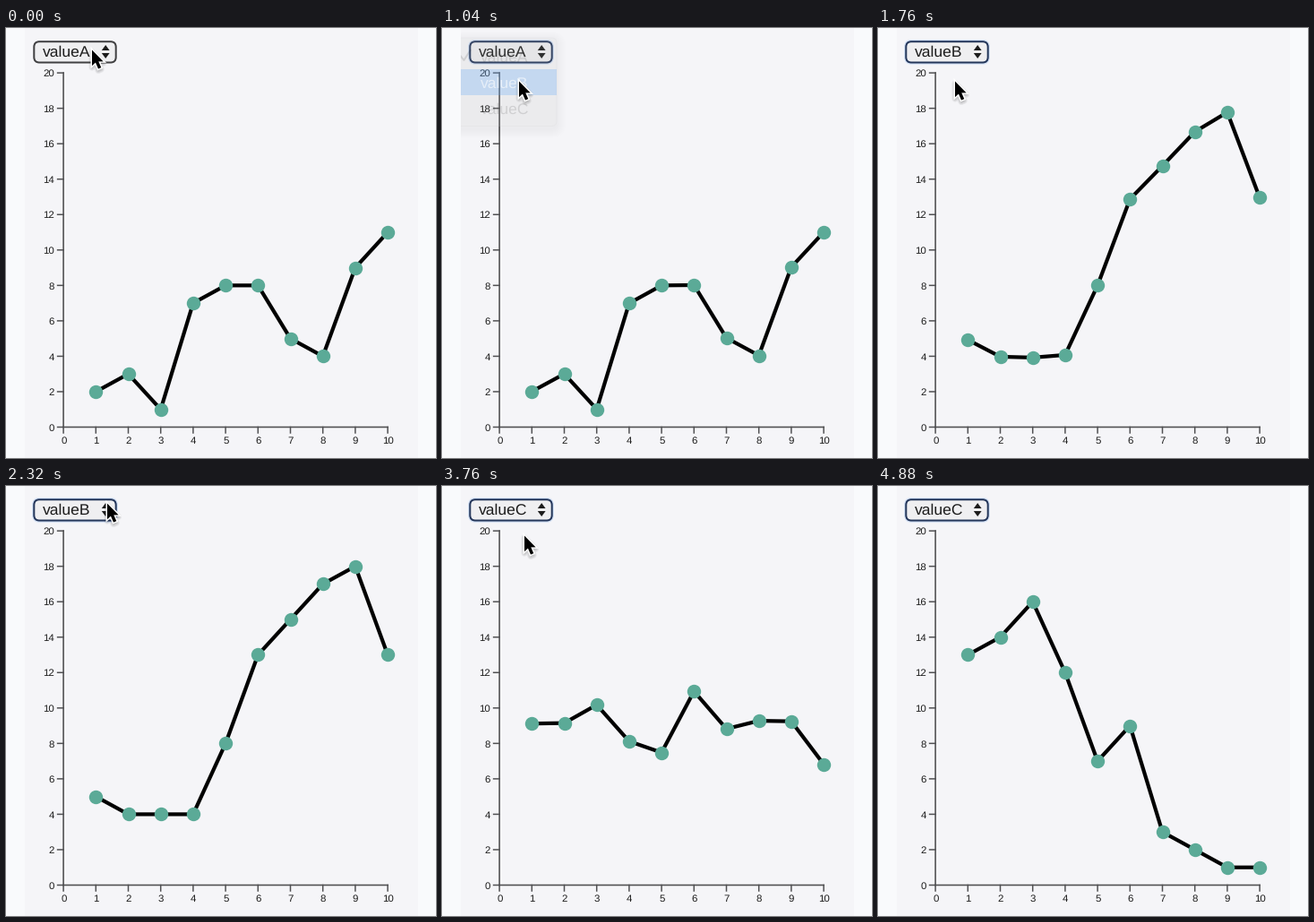
Animation, 480 px wide and 480 px high, one loop 5200 ms. Source, as a matplotlib script:

```python
import matplotlib.pyplot as plt
import numpy as np
from matplotlib.animation import FuncAnimation
from matplotlib.patches import FancyBboxPatch, Polygon, Rectangle

SIZE, STEP, LOOP = 480, 80, 5200
PX = 0.72  # points per pixel at 100 dpi
plt.rcParams["font.family"] = "Liberation Sans"
plt.rcParams["text.hinting"] = "none"

NAMES = ["valueA", "valueB", "valueC"]
SERIES = np.array([
    [2, 3, 1, 7, 8, 8, 5, 4, 9, 11],
    [5, 4, 4, 4, 8, 13, 15, 17, 18, 13],
    [13, 14, 16, 12, 7, 9, 3, 2, 1, 1],
])
DURATION = 1000
STARTS = (944, 3255)  # line transitions
OPENS = (240, 2480)   # menu appears
CURSOR_GONE = 4880
ROW_H, ROW_TOP = 29.2, 17

# Pointer: resting spot, then (start, end, new spot)
REST = np.array([96, 24.5])
MOVES = [(320, 640, (86, 59.5)), (1920, 2320, (113, 19.5)),
         (2560, 2880, (92, 55.5))]
ARROW = 0.9 * np.array([(0, 0), (0, 19.6), (4.4, 15.6), (7.8, 23.4),
                        (11.4, 21.8), (8.1, 14.3), (14, 14.3)])

INK, DARK, PAGE = "#505052", "#1c1c1c", "#f9fafc"

fig = plt.figure(figsize=(4.8, 4.8), dpi=100, facecolor=PAGE)
ax = fig.add_axes([0, 0, 1, 1])
ax.set(xlim=(0, SIZE), ylim=(SIZE, 0))
ax.axis("off")


def px(v):
    return 64.1 + 36.2 * np.asarray(v)


def py(v):
    return 445.5 - 19.77 * np.asarray(v)


def label(x, y, s, size, **kw):
    return ax.text(x, y, s, fontsize=size * PX, va="baseline", **kw)


def stroke(xs, ys, width, color, **kw):
    return ax.plot(xs, ys, color=color, lw=width * PX, snap=False, **kw)[0]


def box(x0, y0, x1, y1, radius, **kw):
    style = f"round,pad=0,rounding_size={radius}"
    return ax.add_patch(FancyBboxPatch((x0, y0), x1 - x0, y1 - y0,
                                       boxstyle=style, **kw))


def shape(points, **kw):
    return ax.add_patch(Polygon(points, closed=True, **kw))


def cubic_in_out(t):
    t = np.clip(t, 0, 1)
    return 4 * t ** 3 if t < 0.5 else 1 - 4 * (1 - t) ** 3


def smooth(t):
    t = np.clip(t, 0, 1)
    return t * t * (3 - 2 * t)


# Panel; the strip on its left also hides the menu's overhang
ax.add_patch(Rectangle((21, 0), 439, SIZE, fc="#f5f5f8", lw=0, zorder=0))
ax.add_patch(Rectangle((0, 0), 21, SIZE, fc=PAGE, lw=0, zorder=20))

# Axes
left, base = px(0), py(0)
stroke([left, left], [py(20), base], 1.6, INK, zorder=1)
stroke([left, px(10)], [base, base], 1.6, INK, zorder=1)
for v in range(0, 21, 2):
    stroke([left - 6.5, left], [py(v)] * 2, 1.5, INK, zorder=1)
    label(54.3, py(v) + 4.2, str(v), 11.5, ha="right", color=DARK)
for v in range(11):
    stroke([px(v)] * 2, [base, base + 6.5], 1.5, INK, zorder=1)
    label(px(v) + 0.2, 464, str(v), 11.5, ha="center", color=DARK)

# Chart
xs = px(np.arange(1, 11))
line = stroke(xs, xs, 4.2, "black", zorder=3, solid_joinstyle="miter")
dots = stroke(xs, xs, 0, "#5baa97", zorder=4, marker="o",
              markersize=15.4 * PX, markeredgewidth=0)

# Select button
halo = box(31.3, 15.2, 122.7, 38.5, 6, fc="none", ec="#d3e1f5", lw=4.5 * PX,
           zorder=5)
button = box(31.3, 15.2, 122.7, 38.5, 6, fc="#efeff1", lw=2 * PX, zorder=5)
choice = label(41.3, 32.2, "", 17.5, color=DARK, zorder=6)
for tip, foot in ((19, 25), (34, 28)):
    shape([(111.2, tip), (106.8, foot), (115.6, foot)], fc=DARK, lw=0,
          zorder=6)

# Menu
shadows = [box(0, 0, 1, 1, 6 + k, fc="black", lw=0, zorder=10)
           for k in range(1, 11)]
sheet = box(0, 0, 1, 1, 6, fc="#ebeced", ec="#c4c5c7", lw=0.8 * PX, zorder=11)
marker = ax.add_patch(Rectangle((10, 0), 118, ROW_H, fc="#5aa5fa", lw=0,
                                zorder=12))
tick = stroke([20.5, 24.5, 31.5], [31, 36, 25], 2, DARK, zorder=13)
rows = [label(42.8, 0, n, 17.5, zorder=13, clip_on=True) for n in NAMES]
menu = (*shadows, sheet, marker, tick, *rows)

# Pointer
pointer_shade = [shape(ARROW, fc="black", ec="black", alpha=0.06, lw=w * PX,
                       joinstyle="round", zorder=30) for w in (3, 5, 7)]
pointer_edge = shape(ARROW, fc="white", ec="white", lw=3 * PX, zorder=31)
pointer = shape(ARROW, fc="black", lw=0, zorder=32)


def pointer_at(t):
    spot = REST
    for start, end, goal in MOVES:
        spot = spot + (np.array(goal) - spot) * smooth((t - start) / (end - start))
    return spot


def draw_menu(t, cy):
    k = int(t >= OPENS[1])
    since = t - STARTS[k]
    shown = t >= OPENS[k] and since < 140
    for art in menu:
        art.set_visible(shown)
    if not shown:
        return
    # The sheet fades fastest, the chosen row slowest
    glow = float(np.clip(0.78 - 0.0054 * since, 0, 1))
    faint = glow ** 1.5
    first = ROW_TOP - k * ROW_H
    top, height = first - 6, 3 * ROW_H + 11
    sheet.set_bounds(5, top, 123, height)
    sheet.set_alpha(faint)
    for g, art in enumerate(shadows, 1):
        art.set_bounds(5 - g, top - g + 3, 123 + 2 * g, height + 2 * g)
        art.set_alpha(0.016 * faint)

    lit = k if cy < ROW_TOP + ROW_H else k + 1
    if -140 < since <= -60:  # the chosen row blinks off once
        lit = -1
    marker.set_visible(lit >= 0)
    marker.set_y(first + lit * ROW_H)
    marker.set_alpha(glow)
    for i, art in enumerate(rows):
        art.set_y(first + i * ROW_H + 20.8)
        art.set_color("white" if i == lit else DARK)
        art.set_alpha(glow ** 0.4 if i == lit else faint)
    tick.set_color("white" if lit == k else DARK)
    tick.set_alpha(faint)


def update(i):
    t = i * STEP
    ys = SERIES[0] * 1.0
    for k, start in enumerate(STARTS):
        ys += (SERIES[k + 1] - SERIES[k]) * cubic_in_out((t - start) / DURATION)
    line.set_ydata(py(ys))
    dots.set_ydata(py(ys))

    choice.set_text(NAMES[sum(t >= s + 130 for s in STARTS)])
    focused = t >= OPENS[0]
    halo.set_visible(focused)
    button.set_edgecolor("#24365a" if focused else "#404042")

    spot = pointer_at(t)
    draw_menu(t, spot[1])
    for art in (*pointer_shade, pointer_edge, pointer):
        art.set_visible(t < CURSOR_GONE)
        art.set_xy(ARROW + spot)
    for art in pointer_shade:
        art.set_xy(ARROW + spot + (0, 2))
    return []


anim = FuncAnimation(fig, update, frames=LOOP // STEP, interval=STEP,
                     init_func=lambda: update(0), repeat=True, repeat_delay=0)
plt.show()
```
